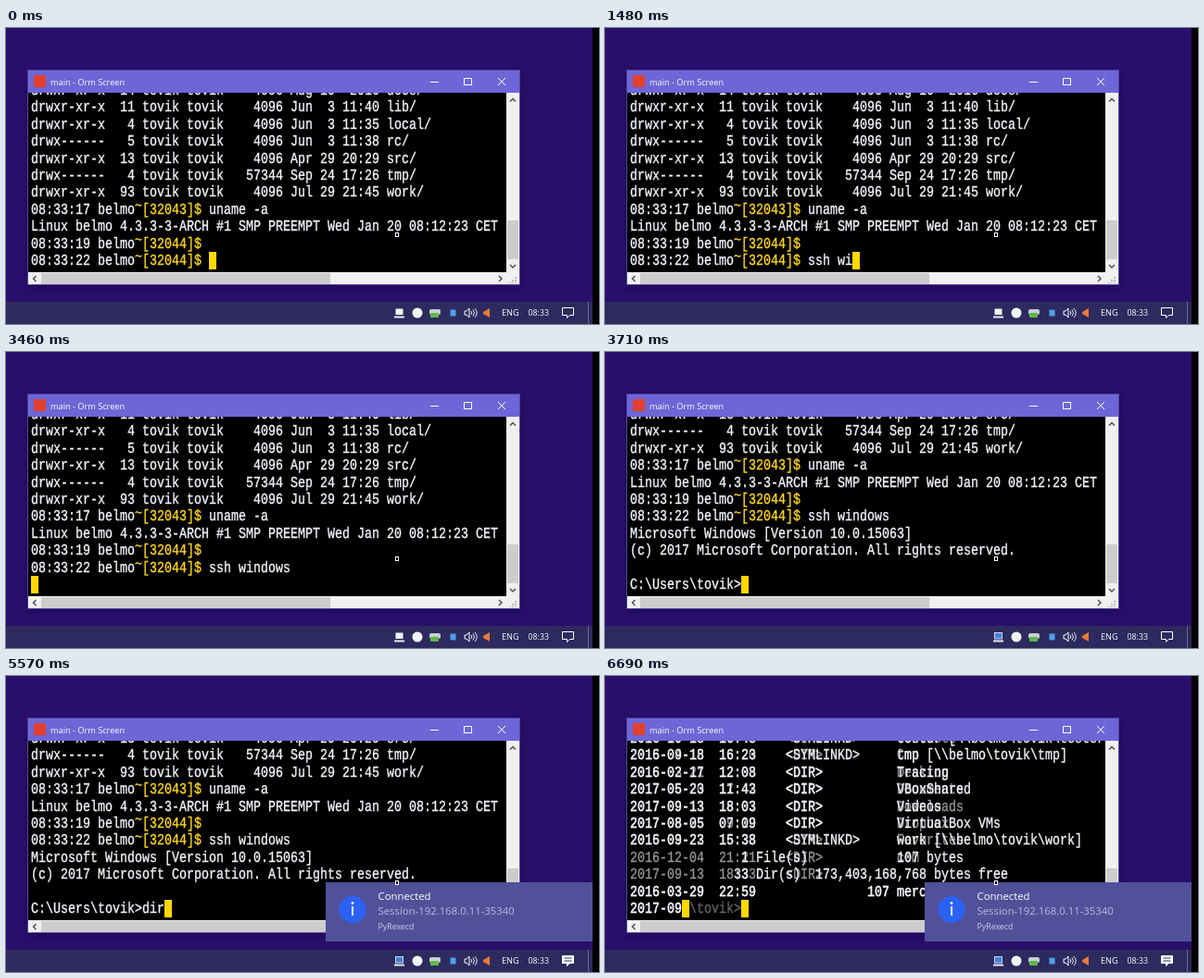
Write an HTML page that moves like this. It is 640 px wide and 320 px high and loops after 8000 ms.

```html
<!DOCTYPE html>
<html lang="en">
<head>
<meta charset="utf-8">
<title>Terminal session</title>
<style>
  html, body { margin: 0; width: 100%; height: 100%; overflow: hidden; background: #000; }
  svg { display: block; width: 100vw; height: 100vh; }
  text { white-space: pre; }
  .term { font: 13.33px "Liberation Mono", monospace; fill: #f4f6ff; stroke: #f4f6ff;
          stroke-width: .3; text-rendering: geometricPrecision; }
  .term .hot { fill: #ffd61c; stroke: #ffd61c; }
  .ui { font-family: "Open Sans", "Noto Sans", sans-serif; fill: #fff; }
</style>
</head>
<body>
<svg viewBox="0 0 640 320">
  <defs>
    <clipPath id="screen"><rect x="24" y="70" width="516" height="194"/></clipPath>
    <filter id="blur"><feGaussianBlur stdDeviation="3"/></filter>
  </defs>
  <rect width="640" height="320" fill="#000"/>
  <rect width="633" height="297" fill="#290f6b"/>
  <rect y="296" width="633" height="24" fill="#2c2a5e"/>
  <path d="M628.500 296v24" stroke="#6a6894"/>

  <!-- window -->
  <rect x="23" y="48" width="533" height="233" fill="#0c0430" opacity=".35" filter="url(#blur)"/>
  <rect x="23.500" y="45.500" width="531" height="232" fill="#6d66d6" stroke="#4f489f"/>
  <rect x="30" y="51" width="13" height="13" rx="1" fill="#e0402f"/>
  <text class="ui" x="48" y="61.500" font-size="9.2">main - Orm Screen</text>
  <g fill="none" stroke="#fff">
    <path d="M458 58.500h9M531 54l8 8M539 54l-8 8"/>
    <rect x="494.500" y="54.500" width="8" height="7"/>
  </g>
  <rect x="24" y="70" width="530" height="207" fill="#f0f0f0"/>
  <rect x="24" y="70" width="516" height="194" fill="#000"/>
  <rect x="541" y="208" width="12" height="42" fill="#cdcdcd"/>
  <rect x="38" y="265" width="312" height="12" fill="#cdcdcd"/>
  <path d="M544 79.500l3-3 3 3M544 256l3 3 3-3M32.500 268l-3 3 3 3M532 268l3 3-3 3"
        fill="none" stroke="#505050" stroke-width="1.5"/>
  <path d="M550 269v7M547 272v4M544 275v1" stroke="#bbb" stroke-width="2" stroke-dasharray="2 1"/>

  <g id="term" clip-path="url(#screen)"></g>

  <!-- tray -->
  <rect id="monitor" x="420.500" y="303.500" width="8" height="6.500"/>
  <path d="M419 312.500h11" stroke="#e8e8f0" stroke-width="2"/>
  <circle cx="444" cy="308" r="5.500" fill="#f4f4f4"/>
  <rect x="457" y="304" width="12" height="6" rx="2" fill="#c9ced0"/>
  <rect x="458" y="308" width="9" height="5" rx="1" fill="#62b84a"/>
  <rect x="479.500" y="304.500" width="6" height="7" fill="#4f9fe8"/>
  <path d="M495 306h2l3-3v10l-3-3h-2z" fill="none" stroke="#fff"/>
  <path d="M502 306q1.500 2 0 4M504 304.500q3 3.500 0 7M506 303q4.500 5 0 10" fill="none" stroke="#fff" stroke-width=".9"/>
  <path d="M515 307l7-4v10l-7-4z" fill="#e8793a"/>
  <text class="ui" x="535" y="311.300" font-size="9.2">ENG</text>
  <text class="ui" x="563.500" y="311.300" font-size="8.8">08:33</text>
  <path id="bubble" d="M600.500 302.500h12v8h-4l-3 3v-3h-5z" stroke="#fff"/>
  <path id="notes" d="M602.500 305h8M602.500 308h8" stroke="#2c2a5e"/>

  <g id="toast">
    <rect x="345" y="223" width="288" height="64" fill="#51519a"/>
    <circle cx="374" cy="252.500" r="14.500" fill="#2c62f4"/>
    <path d="M374 249v10" stroke="#fff" stroke-width="2"/>
    <circle cx="374" cy="245.500" r="1.400" fill="#fff"/>
    <g class="ui">
      <text x="401.500" y="242" font-size="11.35">Connected</text>
      <text x="401.500" y="258" font-size="11.35" style="fill:#b9b8e2">Session-192.168.0.11-35340</text>
      <text x="401.500" y="274" font-size="8.8" style="fill:#cfcee8">PyRexecd</text>
    </g>
  </g>
  <rect x="420.500" y="221.500" width="3" height="4" fill="#000" stroke="#fff"/>
</svg>
<script>
const LOOP = 8000, LEFT = 27, CELL = 8, PITCH = 18.4, BASE = 256, ROWS = 11;
const USER = "tovik", HOST = "belmo";
const $ = id => document.getElementById(id);
const esc = s => s.replace(/&/g, "&amp;").replace(/</g, "&lt;");

const entry = (mode, links, size, date, name) =>
  mode + String(links).padStart(4) + ` ${USER} ${USER}` + String(size).padStart(8) + ` ${date} ${name}/`;
const prompt = (time, n, cmd = "") => ({ who: `08:33:${time} ${HOST}`, mark: `[${n}]$`, cmd });

const history = [
  entry("drwxr-xr-x", 14, 4096, "Aug 10  2016", "docs"),
  entry("drwxr-xr-x", 11, 4096, "Jun  3 11:40", "lib"),
  entry("drwxr-xr-x", 4, 4096, "Jun  3 11:35", "local"),
  entry("drwx------", 5, 4096, "Jun  3 11:38", "rc"),
  entry("drwxr-xr-x", 13, 4096, "Apr 29 20:29", "src"),
  entry("drwx------", 4, 57344, "Sep 24 17:26", "tmp"),
  entry("drwxr-xr-x", 93, 4096, "Jul 29 21:45", "work"),
  prompt(17, 32043, "uname -a"),
  `Linux ${HOST} 4.3.3-3-ARCH #1 SMP PREEMPT Wed Jan 20 08:12:23 CET`,
  prompt(19, 32044)
];
const banner = [
  "Microsoft Windows [Version 10.0.15063]",
  "(c) 2017 Microsoft Corporation. All rights reserved.",
  ""
];
const shell = `C:\\Users\\${USER}>`;

// Windows listing: date, kind at column 21, name at column 36
const item = (date, time, name, kind = "<DIR>") =>
  `${date}  ${time}`.padEnd(21) + kind.padEnd(15) + name;
const link = (date, time, name) =>
  item(date, time, `${name} [\\\\${HOST}\\${USER}\\${name}]`, "<SYMLINKD>");

const early = [
  item("2016-10-15", "16:43", "Contacts"),
  item("2015-04-18", "16:20", "Cmp"),
  item("2016-03-21", "12:03", "Desktop"),
  item("2017-06-20", "17:42", "Documents"),
  item("2017-09-13", "18:03", "Downloads"),
  item("2017-08-25", "09:19", "Dropbox"),
  item("2015-03-22", "16:33", "Favorites"),
  item("2016-12-04", "21:21", "com"),
  item("2017-09-13", "18:33", ""),
  "2016-03-29  22:59".padEnd(32) + "107 mercurial.ini",
  "2017-09"
];
const late = [
  link("2016-10-18", "16:48", "tester"),
  link("2016-09-18", "16:23", "tmp"),
  item("2016-02-17", "12:08", "Tracing"),
  item("2017-05-23", "11:43", "VBoxShared"),
  item("2017-09-13", "18:03", "Videos"),
  item("2017-08-05", "07:09", "VirtualBox VMs"),
  link("2016-09-23", "15:38", "work"),
  " ".repeat(15) + "1 File(s)".padEnd(21) + "107 bytes",
  " ".repeat(14) + "33 Dir(s)  173,403,168,768 bytes free",
  early[9],
  "2017-09"
];

// time, characters typed so far
const sshKeys = [[500, 1], [620, 2], [740, 3], [990, 4], [1360, 5], [1480, 6],
                 [1600, 8], [1720, 9], [1840, 10], [2090, 11]];
const dirKeys = [[5330, 1], [5450, 2], [5570, 3]];
const typed = (word, keys, t) =>
  word.slice(0, keys.reduce((n, [at, len]) => t >= at ? len : n, 0));

// the tilde sits high in its cell
const promptMarkup = ({ who, mark, cmd }) =>
  `${who}<tspan class="hot" dy="-3">~</tspan><tspan class="hot" dy="3">${mark}</tspan> ${cmd}`;

function drawLine(line, up) {
  const body = typeof line === "string" ? esc(line) : promptMarkup(line);
  return `<text class="term" transform="translate(${LEFT} ${BASE - up * PITCH}) scale(1 1.25)">${body}</text>`;
}
const drawLines = lines =>
  lines.slice(-ROWS).map((l, i, all) => drawLine(l, all.length - 1 - i)).join("");
const drawCursor = col =>
  `<rect x="${LEFT + col * CELL}" y="242" width="8" height="19" fill="#ffd800"/>`;

function screen(t) {
  const cmd = typed("ssh windows", sshKeys, t);
  const log = [...history, prompt(22, 32044, cmd)];
  if (t < 3460) return drawLines(log) + drawCursor(24 + cmd.length);
  if (t < 3710) return drawLines([...log, ""]) + drawCursor(0);
  if (t < 6570) {
    const line = shell + typed("dir", dirKeys, t);
    return drawLines([...log, ...banner, line]) + drawCursor(line.length);
  }
  if (t < 6690) return drawLines(early) + drawCursor(7);
  // half-refreshed picture: the older listing shows through
  const rest = " ".repeat(8) + shell.slice(8);
  return `<g opacity=".6">${drawLines(early)}</g>` + drawLines(late) +
    `<g opacity=".4">${drawLine(rest, 0)}</g>` + drawCursor(7) + drawCursor(15);
}

let shown = "";
function render(t) {
  const next = screen(t);
  if (next !== shown) $("term").innerHTML = shown = next;
  const online = t >= 3710, unread = t >= 4080;
  $("monitor").setAttribute("fill", online ? "#3f7fe0" : "#f4f4f4");
  $("monitor").setAttribute("stroke", online ? "#d4d6e0" : "none");
  $("bubble").setAttribute("fill", unread ? "#fff" : "none");
  $("notes").style.display = unread ? "" : "none";
  $("toast").style.display = t >= 4330 ? "" : "none";
}

const start = performance.now();
function tick() {
  render((performance.now() - start) % LOOP);
  requestAnimationFrame(tick);
}
tick();
</script>
</body>
</html>
```
